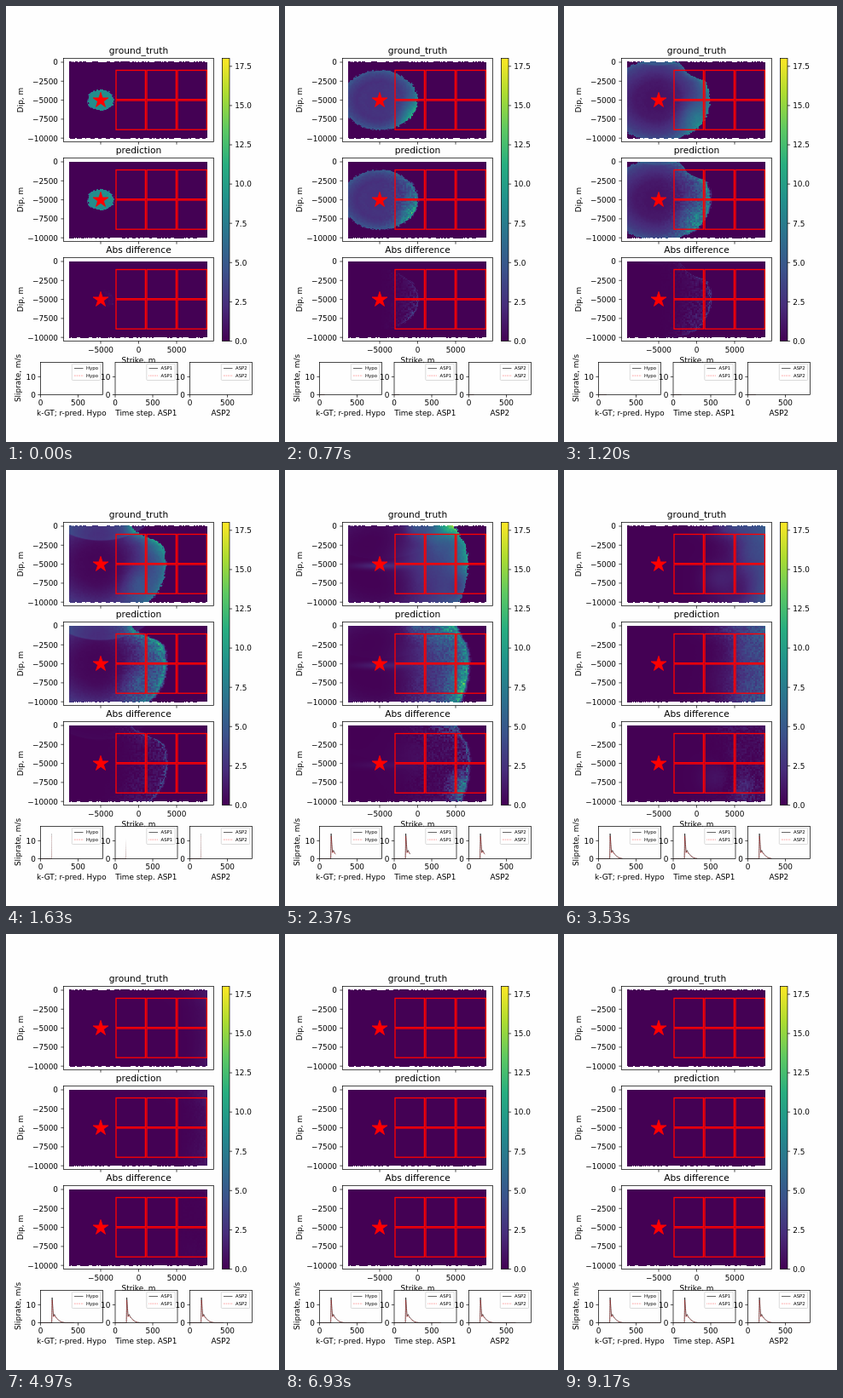
Animation of 320x512 px, one loop 9.2 s. Source, as an HTML page with a canvas:

```html
<!DOCTYPE html>
<html lang="en">
<head>
<meta charset="utf-8">
<title>Slip rate fields</title>
<style>
  html, body { margin: 0; width: 100%; height: 100%; overflow: hidden; background: #fefefe; }
  canvas, #plot { position: absolute; display: block; }
  canvas { left: 74px; top: 65px; }
  #plot { left: 0; top: 0; }
  text { font-family: "DejaVu Sans", sans-serif; fill: #000; }
</style>
</head>
<body>
<canvas id="field" width="162" height="325"></canvas>
<svg id="plot" width="320" height="512" viewBox="0 0 320 512"></svg>
<script>
const BG = '#fefefe', INK = '#000', RED = '#f00';
const LOOP = 9200, STEPS = 828;
const W = 162, H = 91, PITCH = 117;
const svg = document.getElementById('plot');

// ---------- static drawing ----------
function add(tag, attrs, parent = svg) {
  const el = document.createElementNS('http://www.w3.org/2000/svg', tag);
  for (const k in attrs) el.setAttribute(k, attrs[k]);
  return parent.appendChild(el);
}
function label(str, x, y, size = 8.89, anchor = 'middle', turn = 0) {
  const attrs = { x, y: turn ? y : Math.round(y), 'font-size': size, 'text-anchor': anchor };
  if (turn) attrs.transform = `rotate(${turn} ${x} ${y})`;
  add('text', attrs).textContent = str;
}
function line(x1, y1, x2, y2, attrs = {}) {
  add('line', { x1, y1, x2, y2, stroke: INK, 'stroke-width': 0.71, ...attrs });
}
function box(x, y, width, height, attrs = {}) {
  add('rect', { x, y, width, height, fill: 'none', stroke: INK, 'stroke-width': 0.71, ...attrs });
}
const tickX = (x, y) => line(x, y, x, y + 3.1);
const tickY = (x, y) => line(x - 3.1, y, x, y);
const minus = v => String(v).replace('-', '\u2212');

function star(cx, cy, r) {
  const pts = [];
  for (let i = 0; i < 10; i++) {
    const a = i * Math.PI / 5, q = i % 2 ? r * 0.382 : r;
    pts.push((cx + q * Math.sin(a)).toFixed(2) + ',' + (cy - q * Math.cos(a)).toFixed(2));
  }
  add('polygon', { points: pts.join(' '), fill: RED, stroke: RED, 'stroke-width': 0.8 });
}

function panel(title, i) {
  const top = 61.5 + i * PITCH, bottom = top + 98;
  for (let r = 0; r < 2; r++)
    for (let c = 0; c < 3; c++)
      box(129 + c * 36, top + 14 + r * 35.5, 34.4, 34.2, { stroke: RED, 'stroke-width': 1.33 });
  star(111, top + 49.3, 9.4);
  box(67.5, top, 176, 98);
  label(title, 155.5, top - 5.3, 10.67);
  label('Dip, m', 20, top + 49, 8.89, 'middle', -90);
  for (let k = 0; k < 5; k++) {
    const y = top + 4.5 + k * 22.3;
    tickY(67.5, y);
    label(minus(-2500 * k), 61, y + 3.3, 8.89, 'end');
  }
  for (let k = -1; k < 2; k++) {
    const x = 155.5 + k * 44.5;
    tickX(x, bottom);
    if (i === 2) label(minus(5000 * k), x, bottom + 13.2);
  }
}

// Colours from low to high values
const STOPS = ['440154', '472d7b', '3b528b', '2c728e', '21918c', '28ae80', '5ec962', 'addc30', 'fde725'];
const RGB = STOPS.map(h => [0, 2, 4].map(i => parseInt(h.substr(i, 2), 16)));

function colorbar() {
  const grad = add('linearGradient', { id: 'scale', x1: 0, y1: 1, x2: 0, y2: 0 });
  STOPS.forEach((c, i) => add('stop', { offset: i / 8, 'stop-color': '#' + c }, grad));
  box(253.5, 61.5, 8.5, 332, { fill: 'url(#scale)' });
  for (let v = 0; v <= 17.5; v += 2.5) {
    const y = 393.5 - v * 18.44;
    line(262, y, 265.1, y);
    label(v.toFixed(1), 268.2, y + 3.3, 8.89, 'start');
  }
}

// Slip rate against time step
const TRACE = [[0, 0], [149, 0], [154, 14], [164, 8], [172, 3.5], [184, 4.7], [199, 3.4],
  [213, 2.6], [235, 1.7], [260, 0.8], [290, 0.3], [330, 0], [STEPS, 0]];
const STEP_PX = 73 / STEPS, RATE_PX = 2.11;
const THIN = { fill: 'none', stroke: '#000', 'stroke-width': 0.6 };
const DOTS = { fill: 'none', stroke: RED, 'stroke-width': 0.6, 'stroke-dasharray': '0.6 1' };
const windows = [];

function chart(name, caption, i) {
  const x = 40.5 + i * 87.5, y = 418.5, base = y + 38;
  box(x, y, 73, 38, { fill: BG, stroke: 'none' });
  const win = add('svg', { x, y, width: 0, height: 38, overflow: 'hidden' });
  const path = gain => TRACE.map(([s, v]) => (s * STEP_PX).toFixed(2) + ',' + (38 - v * gain * RATE_PX).toFixed(2)).join(' ');
  add('polyline', { points: path(1), ...THIN }, win);
  add('polyline', { points: path(0.9), ...DOTS }, win);
  windows.push(win);
  box(x, y, 73, 38);
  tickX(x, base);
  tickX(x + 44, base);
  label('0', x, 469);
  label('500', x + 44, 469);
  for (const v of [0, 10]) {
    tickY(x, base - v * RATE_PX);
    label(v, x - 5.6, base - v * RATE_PX + 3.3, 8.89, 'end');
  }
  label(caption, x + 36.3, 481.3);
  box(x + 36.8, y + 1.8, 33.4, 19.2, { fill: BG, stroke: '#ccc', rx: 1 });
  [THIN, DOTS].forEach((style, k) => {
    line(x + 39.5, y + 7 + k * 8.6, x + 50, y + 7 + k * 8.6, style);
    label(name, x + 53.6, y + 8.9 + k * 8.6, 5.33, 'start');
  });
}

['ground_truth', 'prediction', 'Abs difference'].forEach(panel);
colorbar();
label('Strike, m', 155.5, 418.8);
chart('Hypo', 'k-GT; r-pred. Hypo', 0);
chart('ASP1', 'Time step. ASP1', 1);
chart('ASP2', 'ASP2', 2);
label('Sliprate, m/s', 16.8, 437, 8.89, 'middle', -90);

// ---------- rupture field ----------
const clamp = v => Math.max(0, Math.min(1, v));
const ease = v => { const c = clamp(v); return c * c * (3 - 2 * c); };
const bell = (v, w) => Math.exp(-(v * v) / (w * w));
const spot = (x, y, cx, cy, wx, wy) => bell(x - cx, wx) * bell(y - cy, wy);
const SPEED = 1.24, CORE = 15;

let seed = 7;
const random = () => (seed = seed * 16807 % 2147483647) / 2147483647;
const grain = Array.from({ length: W * H }, random);

// Arrival, reflected arrival and strength at each cell, relative to the star
const cells = [];
for (let j = 0; j < H; j++) {
  for (let i = 0; i < W; i++) {
    const x = i - 36.5, y = j - 45;
    const g = grain[(j >> 1) * W + (i >> 1)] - 0.5;
    const ky = 1.25 - 0.25 * clamp((x - 30) / 65);
    // The front trails near the surface once it is past the first patch
    const lag = ease((-y - 20) / 15) * ease((x - 22) / 20) * Math.max(4, 14 - Math.max(0, x - 45) * 0.22);
    const d = Math.hypot(x, y * ky);
    const d2 = Math.hypot(x, (y + 89) * 1.25);
    const out = clamp((d - CORE) / 12);
    const base = 8.8 * (1 - out) + out * (5 + 3.6 * clamp(x / 100)
      + 5.5 * spot(x, y, 38, 18, 16, 18) + 3.2 * spot(x, y, 64, -24, 15, 16)
      + 3 * spot(x, y, 40, -44, 10, 10));
    const deep = spot(x, y, 94, 28, 16, 20);
    cells.push({
      x, y,
      at: Math.max(0, (d + lag - CORE) / SPEED + g * 2),
      echo: (d2 - CORE) / SPEED,
      soft: 1 + Math.max(0, x - 15) / 30,
      late: 28 + Math.max(0, x) / 8,
      truth: (base + 8 * spot(x, y, 82, -46, 17, 13) + 2 * spot(x, y, 98, -8, 14, 20)) * (1 - 0.45 * deep),
      guess: (base + 4 * spot(x, y, 82, -46, 14, 13) + 4 * deep) * (1 + 0.5 * g * clamp(x / 40))
    });
  }
}

function pulse(s, rise, fall) {
  if (s <= 0) return Math.max(0, 1 + s / rise) ** 2;
  return 0.45 * Math.exp(-s / 5) + 0.55 * bell(s, fall);
}

function values(c, n) {
  const { x, y } = c, s = n - c.at;
  const echo = 2 * pulse(n - c.echo, 2, 22) * bell(n - 46, 16);
  const wake = s > 0 ? bell(n - 71, 12) * (2 * spot(x, y, 0, 2, 30, 4) + 2 * spot(x, y, 48, -6, 30, 28)) : 0;
  let truth = c.truth * pulse(s, 1, c.late) + echo + wake;
  let guess = c.guess * pulse(s, c.soft, c.late) + 0.85 * echo + 0.7 * wake;
  const late = bell(n - 102, 13);
  if (late > 0.01) {
    truth += late * (1.4 * spot(x, y, 70, 16, 20, 18) + 0.6 * spot(x, y, 108, -18, 14, 20));
    guess += late * (1.3 * spot(x, y, 101, -14, 18, 20) + 0.5 * spot(x, y, 74, 14, 18, 20));
  }
  return [truth, guess, Math.abs(truth - guess)];
}

const SHADES = 512;
const lut = Array.from({ length: SHADES }, (_, i) => {
  const p = i / (SHADES - 1) * 8, k = Math.min(7, Math.floor(p)), f = p - k;
  return RGB[k].map((c, m) => c + (RGB[k + 1][m] - c) * f);
});

// Slightly ragged top edge on the first panel, bottom edge on all
function raggedEdge() {
  let on = true;
  return Array.from({ length: W }, () => {
    if (random() < 0.3) on = !on;
    return on;
  });
}
const topEdge = raggedEdge();
const bottomEdges = [raggedEdge(), raggedEdge(), raggedEdge()];

const ctx = document.getElementById('field').getContext('2d');
const img = ctx.createImageData(W, 325);

function drawField(n) {
  for (let j = 0, k = 0; j < H; j++) {
    for (let i = 0; i < W; i++, k++) {
      const v = values(cells[k], n);
      for (let p = 0; p < 3; p++) {
        const o = ((j + p * PITCH) * W + i) * 4;
        const rgb = lut[Math.round(clamp(v[p] / 18) * (SHADES - 1))];
        img.data[o] = rgb[0];
        img.data[o + 1] = rgb[1];
        img.data[o + 2] = rgb[2];
        const hidden = j === 0 ? p > 0 || topEdge[i] : j === H - 1 && bottomEdges[p][i];
        img.data[o + 3] = hidden ? 0 : 255;
      }
    }
  }
  ctx.putImageData(img, 0, 0);
}

// ---------- playback: three pictures per 100 ms ----------
function frameAt(t) {
  const r = t % 100;
  return Math.floor(t / 100) * 3 + (r >= 70 ? 2 : r >= 30 ? 1 : 0);
}

let shown = -1;
const start = performance.now();
function tick() {
  const n = frameAt((performance.now() - start) % LOOP);
  if (n !== shown) {
    shown = n;
    drawField(n);
    windows.forEach(w => w.setAttribute('width', (n * 3 * STEP_PX).toFixed(2)));
  }
  requestAnimationFrame(tick);
}
tick();
</script>
</body>
</html>
```
